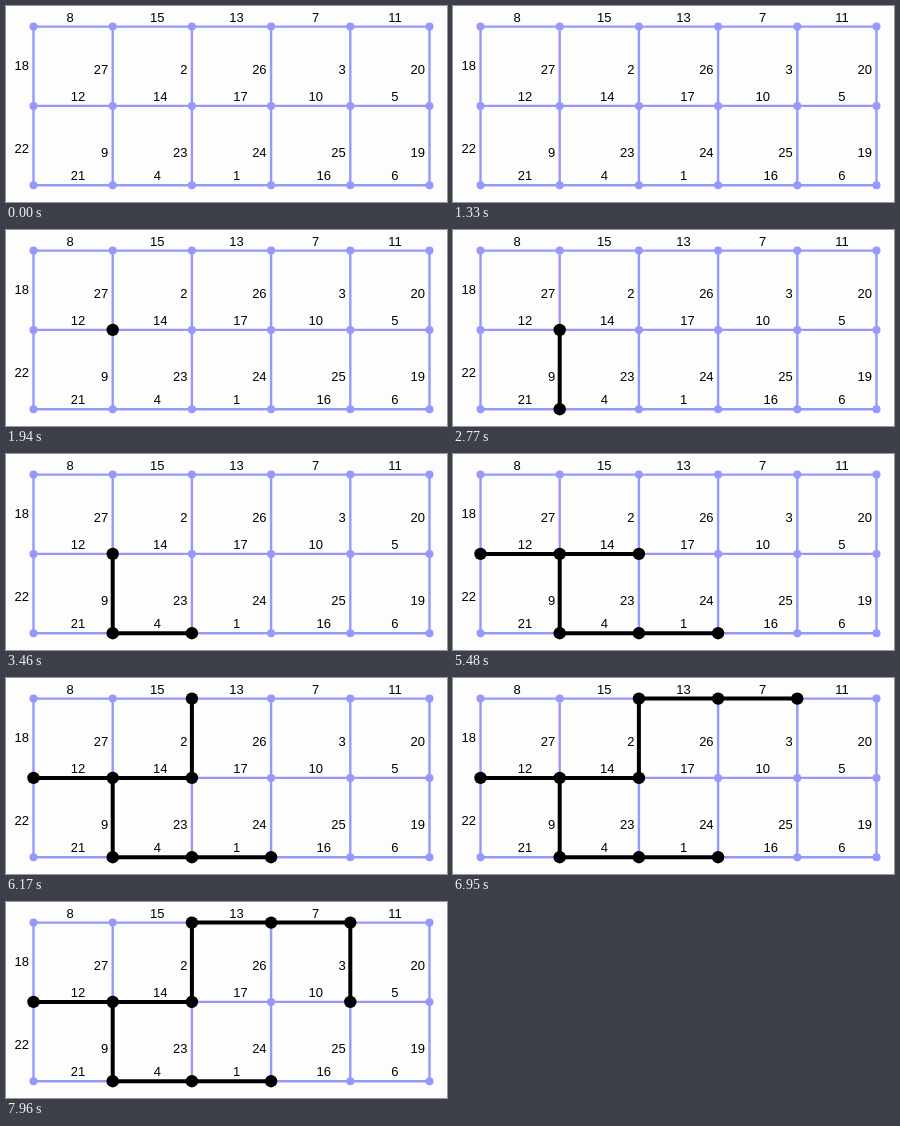
Animation of 441 by 196 pixels, one loop 8 s. Source, as an HTML page:

```html
<!DOCTYPE html>
<html lang="en">
<head>
<meta charset="utf-8">
<title>Minimum spanning tree on a grid</title>
<style>
  html, body { margin: 0; width: 100%; height: 100%; overflow: hidden; background: #fdfdfe; }
  svg { display: block; width: 441px; height: 196px; }
  .light line { stroke: #9599fb; stroke-width: 2.4; }
  .light circle { fill: #9599fb; }
  .tree line { stroke: #000; stroke-width: 4; }
  text { font: 13px "Liberation Sans", Arial, sans-serif; }
</style>
</head>
<body>
<svg viewBox="0 0 441 196">
  <g class="light"></g>
  <g class="tree"></g>
  <g class="labels"></g>
</svg>
<script>
const LOOP = 8000, FIRST = 1430, STEP = 687;
const px = c => 27.5 + 79.2 * c;
const py = r => 20.6 + 79.3 * r;

// edge weights, one string per row of the grid
const across = ["8 15 13 7 11", "12 14 17 10 5", "21 4 1 16 6"];
const down = ["18 27 2 26 3 20", "22 9 23 24 25 19"];
// sideways shift of the labels that were placed by hand
const nudge = { 8: -8, 14: 3, 17: 4, 16: 8 };

const [light, tree, labels] = ["light", "tree", "labels"].map(
  name => document.querySelector("." + name));

function add(parent, tag, attrs = {}) {
  const el = document.createElementNS("http://www.w3.org/2000/svg", tag);
  for (const key in attrs) el.setAttribute(key, attrs[key]);
  return parent.appendChild(el);
}
const line = (parent, [c1, r1], [c2, r2]) =>
  add(parent, "line", { x1: px(c1), y1: py(r1), x2: px(c2), y2: py(r2) });
const node = (parent, [c, r], radius) =>
  add(parent, "circle", { cx: px(c), cy: py(r), r: radius });
const label = (value, x, y, anchor) =>
  add(labels, "text", { x, y, "text-anchor": anchor }).textContent = value;

const edges = [];
const nodes = new Map();

function addEdge(weight, a, b) {
  edges.push({ weight, a, b });
  line(light, a, b);
  for (const p of [a, b]) nodes.set(String(p), p);
}

across.forEach((row, r) => row.split(" ").forEach((w, c) => {
  addEdge(+w, [c, r], [c + 1, r]);
  label(w, px(c + 0.5) + 5 + (nudge[w] || 0), py(r) - 5, "middle");
}));
down.forEach((row, r) => row.split(" ").forEach((w, c) => {
  addEdge(+w, [c, r], [c, r + 1]);
  label(w, px(c) - 4.5, (c ? 67.5 : 63.5) + 83.5 * r, "end");
}));
nodes.forEach(p => node(light, p, 4));

// Prim's algorithm: always take the lightest edge that leaves the tree
const groups = [];
const reached = new Set();

function reach(point, edge) {
  const g = add(tree, "g");
  if (edge) line(g, edge.a, edge.b);
  node(g, point, 6.2);
  groups.push(g);
  reached.add(String(point));
}
const inTree = p => reached.has(String(p));

edges.sort((e, f) => e.weight - f.weight);
reach([1, 1]);
while (FIRST + STEP * groups.length < LOOP) {
  const next = edges.find(e => inTree(e.a) !== inTree(e.b));
  reach(inTree(next.a) ? next.b : next.a, next);
}

function draw(t) {
  groups.forEach((g, i) => {
    g.style.visibility = t >= FIRST + STEP * i ? "visible" : "hidden";
  });
}

const start = performance.now();
function tick() {
  draw((performance.now() - start) % LOOP);
  requestAnimationFrame(tick);
}
tick();
</script>
</body>
</html>
```
